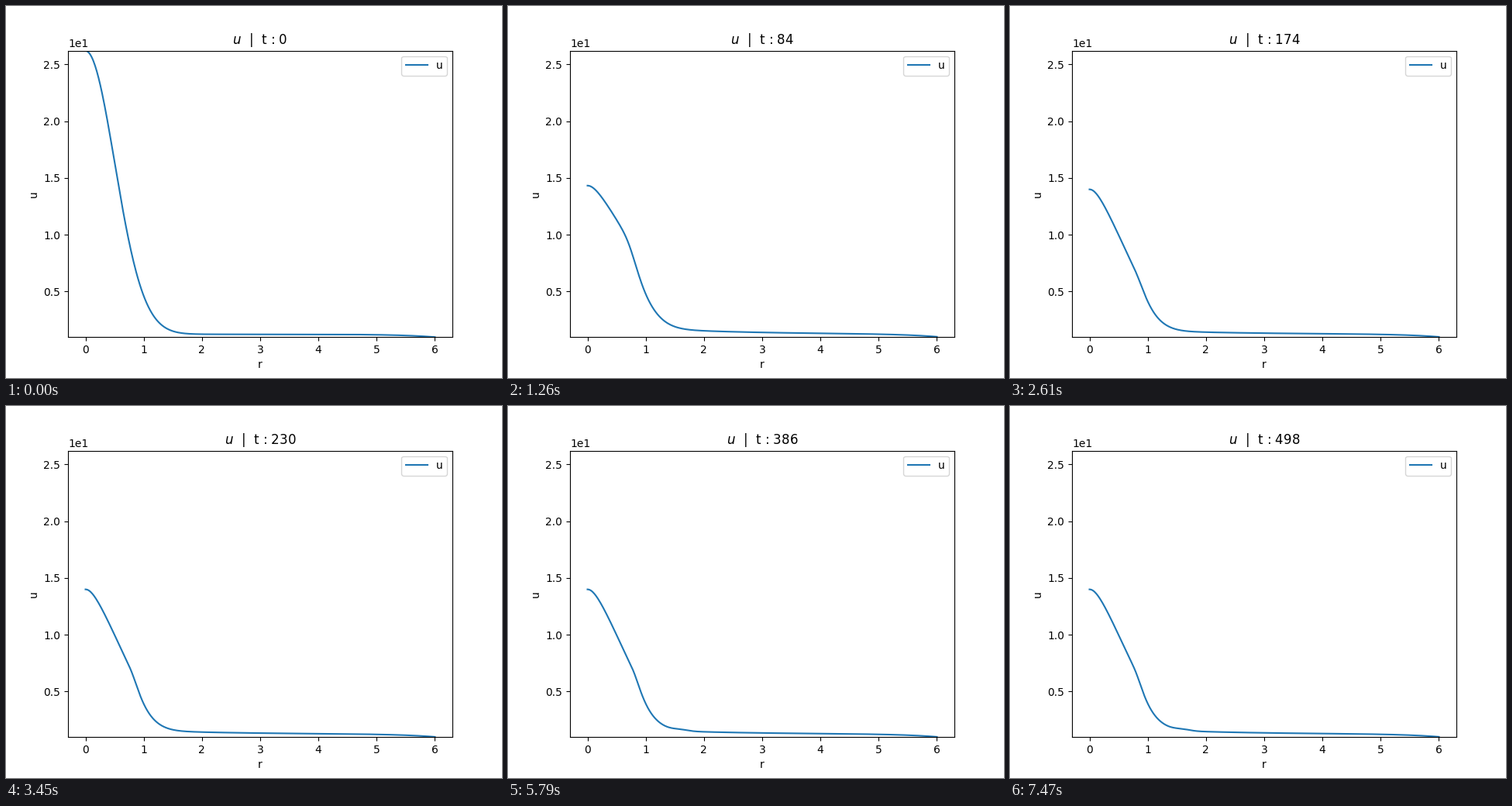
These frames come from a looping animation (640x480 px, 7.5 s). A matplotlib script:

```python
import numpy as np
import matplotlib.pyplot as plt
from matplotlib.animation import FuncAnimation

FRAMES, INTERVAL, STEP = 250, 30, 2
FLOOR, TOP, PLATEAU = 0.99, 26.22, 1.23

r = np.linspace(0, 6, 401)


def bump(x, centre, width):
    return np.exp(-((x - centre) / width) ** 2)


def smooth(t, start, end):
    s = np.clip((t - start) / (end - start), 0, 1)
    return s * s * (3 - 2 * s)


def soft_min(a, b, width):
    return -width * np.logaddexp(-a / width, -b / width)


def flank(t):
    """Gaussian pulse that narrows a little as it settles."""
    return PLATEAU + (TOP - PLATEAU) * np.exp(-(2 + 0.28 * smooth(t, 84, 230)) * r ** 2)


def cone(t):
    """Round-tipped cone that sinks and caps the pulse."""
    peak = 14 + 13.5 * np.exp(-(t / 40.65) ** 1.806)
    slope = 11.9 - 3 * bump(t, 84, 30)
    return peak - slope * (np.hypot(r, 0.2) - 0.2) + 1.2 * r ** 8


def tail(t):
    """Material spread outward past the pulse."""
    amount = 0.22 * (1 - np.exp(-t / 40)) + 0.2 * bump(t, 84, 45) + 0.1 * t / 500
    spread = np.exp((1.5 - r) / 1.7) / (1 + np.exp((1.05 - r) / 0.12))
    return amount * spread + 0.11 * smooth(t, 260, 420) * bump(r, 1.6, 0.18)


def profile(t):
    blend = 0.4 + 1.2 * t / 36 * np.exp(1 - t / 36)
    edge = (PLATEAU - FLOOR) * (r / 6) ** 10
    return soft_min(flank(t), cone(t), blend) + tail(t) - edge


fig, ax = plt.subplots(figsize=(6.4, 4.8), dpi=100)
line, = ax.plot(r, profile(0), label="u")
ax.set(xlabel="r", ylabel="u", xlim=(-0.3, 6.3), ylim=(FLOOR, TOP))
ax.ticklabel_format(axis="y", style="sci", scilimits=(0, 0))
ax.legend(loc="upper right")
title = ax.set_title("")


def update(i):
    t = STEP * i
    line.set_ydata(profile(t))
    title.set_text(f"$u$  |  t : {t}")
    return line, title


anim = FuncAnimation(fig, update, frames=FRAMES, interval=INTERVAL,
                     repeat=True, repeat_delay=0)
plt.show()
```
